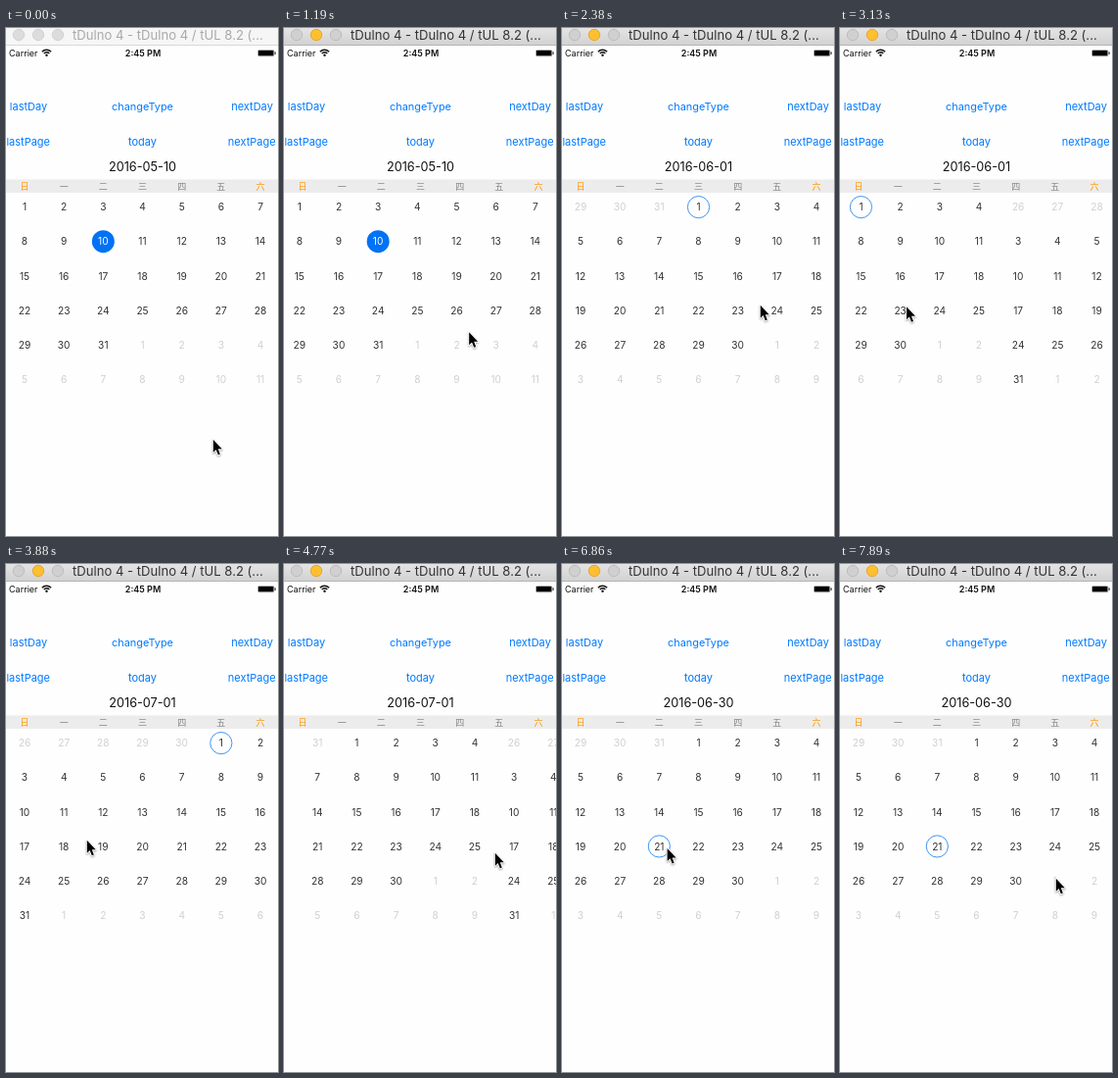
Animation, 278 px wide and 518 px high, one loop 8 s. Source, as an HTML page with a canvas:

```html
<!DOCTYPE html>
<html lang="zh">
<head>
<meta charset="utf-8">
<title>Calendar</title>
<style>
html, body { margin: 0; width: 100%; height: 100%; overflow: hidden; background: #fff; }
canvas { display: block; width: 278px; height: 518px; }
</style>
</head>
<body>
<canvas id="stage"></canvas>
<script>
const W = 278, H = 518, LOOP = 8000, STEP = 149;
const canvas = document.getElementById('stage');
const ctx = canvas.getContext('2d');
const dpr = window.devicePixelRatio || 1;
canvas.width = W * dpr;
canvas.height = H * dpr;

const SANS = 'Inter, Roboto, sans-serif';
const CJK = '"Noto Sans CJK SC", "Noto Sans CJK", sans-serif';
const BLUE = '#007aff', ORANGE = '#ff9500', INK = '#111';
const COL = 40.17, ROW = 35.1, PAGE = COL * 7;
const colX = c => 19 + c * COL;

// All times below are in screen refreshes of STEP ms.
const SWIPE = 4.24, ACTIVE = 8;
const FIRST = { at: -SWIPE, month: 4, day: 10 };
const SWIPES = [
  { at: 7.4, month: 5, day: 1 },
  { at: 19, month: 6, day: 1 },
  { at: 29.4, month: 5, day: 30 }
];
const TAP = { at: 43, month: 5, day: 21 };

// Pointer moves: from, to, x, y; it rests in between
const MOVES = [
  [0, 5, 214, 315],
  [7, 11, 50, 280], [11, 16, 202, 282],
  [19, 22, 20, 284], [22, 26, 82, 281],
  [29, 32, 215, 294], [32, 35, 81, 301],
  [37, 41, 96, 283],
  [45, 50, 200, 343], [50, 53, 220, 320]
];

const progress = (s, from, span) => Math.min(1, Math.max(0, (s - from) / span));
const smooth = p => p * p * (3 - 2 * p);
const cubic = p => p < 0.5 ? 4 * p ** 3 : 1 - 4 * (1 - p) ** 3;

function pointerAt(s) {
  let x = 211, y = 419;
  for (const [from, to, tx, ty] of MOVES) {
    const k = smooth(progress(s, from, to - from));
    x += (tx - x) * k;
    y += (ty - y) * k;
  }
  return [x, y];
}

const scrollAt = s => SWIPES.reduce(
  (m, w) => m + (w.month - m) * cubic(progress(s, w.at, SWIPE)), FIRST.month);

const settledAt = s => [FIRST, ...SWIPES].filter(w => s >= w.at + SWIPE).pop();

function text(str, x, y, size, color, align = 'center', weight = 400, family = SANS) {
  ctx.font = `${weight} ${size}px ${family}`;
  ctx.fillStyle = color;
  ctx.textAlign = align;
  ctx.fillText(str, x, y);
}

function disc(x, y, r, fill, stroke) {
  ctx.beginPath();
  ctx.arc(x, y, r, 0, Math.PI * 2);
  if (fill) { ctx.fillStyle = fill; ctx.fill(); }
  if (stroke) { ctx.strokeStyle = stroke; ctx.lineWidth = 0.9; ctx.stroke(); }
}

function titleBar(active) {
  const g = ctx.createLinearGradient(0, 0, 0, 17);
  g.addColorStop(0, active ? '#e4e4e4' : '#f6f6f6');
  g.addColorStop(1, active ? '#d2d2d2' : '#f6f6f6');
  ctx.fillStyle = g;
  ctx.fillRect(0, 0, W, 17);
  ctx.fillStyle = active ? '#b4b4b4' : '#d8d8d8';
  ctx.fillRect(0, 17, W, 1);
  const off = active ? '#d0d0d0' : '#dcdcdc', rim = active ? '#b9b9b9' : '#d0d0d0';
  for (let i = 0; i < 3; i++) {
    const lit = active && i === 1;
    disc(13 + i * 20, 7, 5.7, lit ? '#ffbf2f' : off, lit ? '#e0a32a' : rim);
  }
  text('tDulno 4 - tDulno 4 / tUL 8.2 (...', 68, 12, 13.1, active ? '#333' : '#a9a9a9', 'left');
}

function statusBar() {
  text('Carrier', 3, 29, 9, INK, 'left');
  ctx.strokeStyle = INK;
  ctx.lineWidth = 1.4;
  for (const r of [3.8, 6.4]) {
    ctx.beginPath();
    ctx.arc(41.5, 28.6, r, -Math.PI * 0.76, -Math.PI * 0.24);
    ctx.stroke();
  }
  disc(41.5, 27.8, 1.2, INK);
  text('2:45 PM', 140, 29, 9, INK, 'center', 600);
  ctx.strokeStyle = '#8a8a8a';
  ctx.lineWidth = 0.7;
  ctx.beginPath();
  ctx.roundRect(257.5, 22.5, 16.4, 6.2, 1.3);
  ctx.stroke();
  ctx.fillStyle = '#000';
  ctx.fillRect(258, 23, 15.4, 5.2);
  ctx.fillRect(274.6, 24.4, 1, 2.4);
}

function controls(date) {
  ['last', 'next'].forEach((side, i) => {
    text(side + 'Day', 23 + i * 228.5, 84, 11, BLUE);
    text(side + 'Page', 22.7 + i * 228.5, 119.5, 11, BLUE);
  });
  text('changeType', 139.5, 84, 10.9, BLUE);
  text('today', 139.5, 119.5, 11, BLUE);
  text(date, 139.5, 145.6, 12.7, INK);
  ctx.fillStyle = '#ececec';
  ctx.fillRect(0, 154.5, W, 13.5);
  [...'日一二三四五六'].forEach((d, c) =>
    text(d, colX(c), 164.5, 9, c % 6 ? '#858585' : ORANGE, 'center', 400, CJK));
}

function monthPage(month, dx, pick) {
  const lead = new Date(2016, month, 1).getDay();
  for (let i = 0; i < 42; i++) {
    const d = new Date(2016, month, 1 - lead + i), day = d.getDate();
    const x = colX(i % 7) + dx, y = 182.6 + Math.floor(i / 7) * ROW;
    const own = d.getMonth() === month;
    const is = p => own && month === p.month && day === p.day;
    const today = is(FIRST);
    if (today) disc(x, y, 11.5, '#0072f5');
    else if (is(pick)) disc(x, y, 11.1, null, '#2a88f2');
    text(day, x, y + 3.7, 10.2, today ? '#fff' : own ? '#333' : '#d0d0d0');
  }
}

function pointer(x, y) {
  ctx.save();
  ctx.translate(x + 0.8, y + 0.7);
  ctx.beginPath();
  [[0, 0], [0, 13], [2.9, 10.3], [5, 15.6], [7, 14.7], [5, 9.6], [9, 9.6]]
    .forEach(p => ctx.lineTo(...p));
  ctx.closePath();
  ctx.shadowColor = 'rgba(0,0,0,.35)';
  ctx.shadowBlur = 2 * dpr;
  ctx.shadowOffsetY = dpr;
  ctx.strokeStyle = '#fff';
  ctx.lineWidth = 1.8;
  ctx.lineJoin = 'round';
  ctx.stroke();
  ctx.shadowColor = 'transparent';
  ctx.fillStyle = '#000';
  ctx.fill();
  ctx.restore();
}

function draw(now) {
  const s = Math.floor((now % LOOP + 7) / STEP);
  const pos = scrollAt(s), settled = settledAt(s);
  const pick = s >= TAP.at ? TAP : settled;
  const two = n => String(n).padStart(2, '0');
  ctx.setTransform(dpr, 0, 0, dpr, 0, 0);
  ctx.fillStyle = '#fefefe';
  ctx.fillRect(0, 0, W, H);
  titleBar(s >= ACTIVE);
  statusBar();
  controls(`2016-${two(settled.month + 1)}-${two(settled.day)}`);
  for (let m = Math.floor(pos); m <= Math.ceil(pos); m++) monthPage(m, (m - pos) * PAGE, pick);
  pointer(...pointerAt(s));
}

const start = performance.now();
function tick() {
  draw(performance.now() - start);
  requestAnimationFrame(tick);
}
tick();
</script>
</body>
</html>
```
